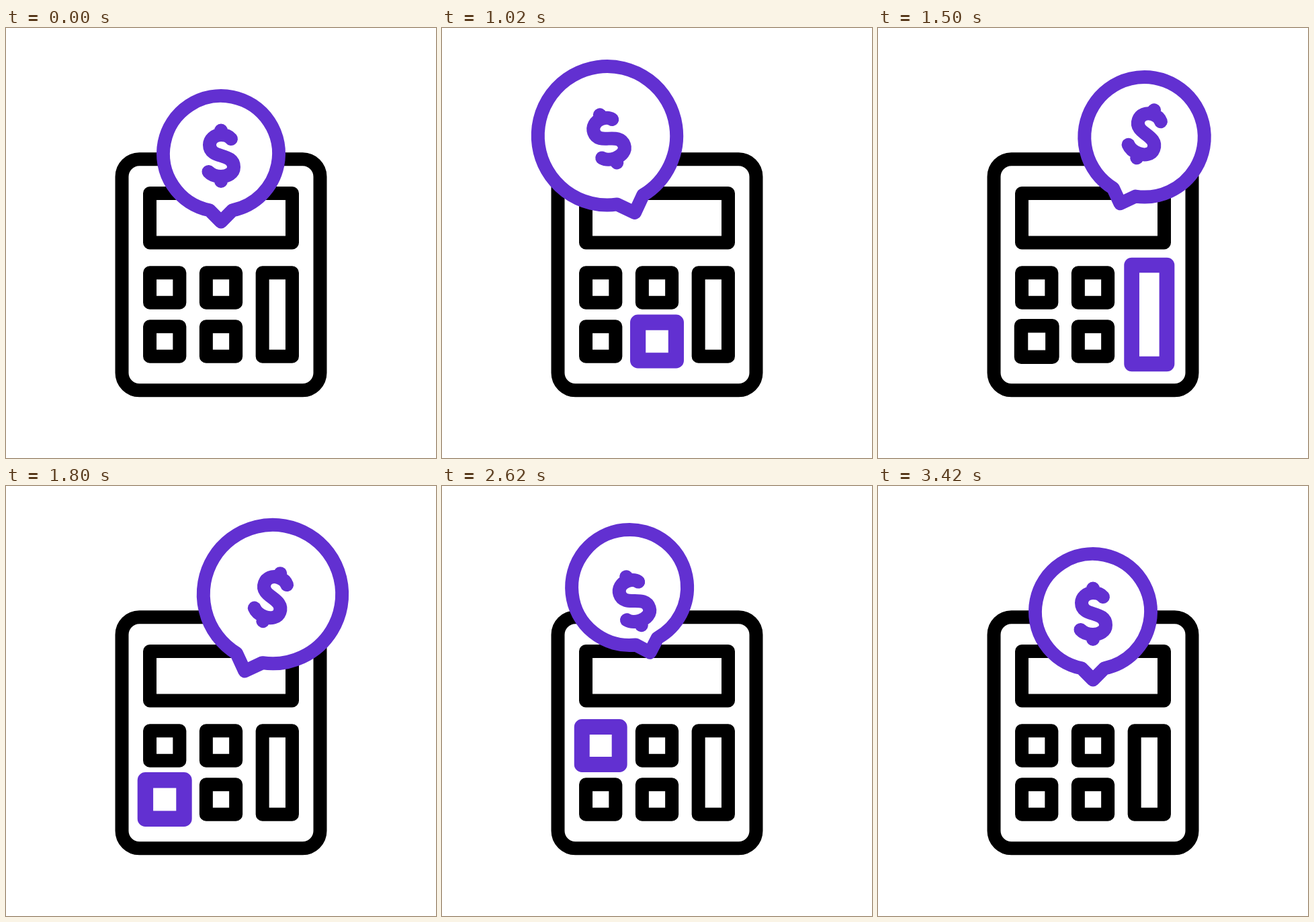
Write an HTML page with a canvas that moves like this. It is 640 by 640 pixels and loops after 3600 ms.

```html
<!DOCTYPE html>
<html lang="en">
<head>
<meta charset="utf-8">
<title>Calculator</title>
<style>
html, body { margin: 0; width: 100%; height: 100%; overflow: hidden; background: #fff; }
canvas { display: block; width: 100vmin; height: 100vmin; }
</style>
</head>
<body>
<canvas id="stage" width="640" height="640"></canvas>
<script>
const ctx = document.getElementById('stage').getContext('2d');
const LOOP = 3600;
const LINE = 20;
const PURPLE = [98, 48, 209];
const VIOLET = `rgb(${PURPLE})`;
const MOVE = 400;   // ms of one bubble move
const RAMP = 140;   // ms to press or release

const smooth = x => {
  x = Math.min(1, Math.max(0, x));
  return x * x * (3 - 2 * x);
};

// Rises after a, falls back to 0 before b
const pulse = (t, a, b, rise = RAMP, fall = rise) =>
  Math.min(smooth((t - a) / rise), smooth((b - t) / fall));

// The bubble leaves for each place at its start time
const rest = { x: 320, y: 190, deg: 0 };
const moves = [
  { start: 220, x: 246.3, y: 164.6, deg: -20 },
  { start: 1000, x: 395.4, y: 165.4, deg: 20 },
  { start: 2260, x: 280, y: 153.8, deg: -17.5 },
  { start: 2620, x: 342.5, y: 127.5, deg: 7.5 },
  { start: 2980, ...rest }
];

function pose(t) {
  let p = rest;
  moves.forEach((to, i) => {
    if (t < to.start) return;
    const end = i + 1 < moves.length ? moves[i + 1].start : LOOP - 180;
    const k = smooth((t - to.start) / Math.min(MOVE, end - to.start));
    const blend = key => p[key] + (to[key] - p[key]) * k;
    p = { x: blend('x'), y: blend('y'), deg: blend('deg') };
  });
  return p;
}

// It swells at each stop
const swell = t => 1 + 0.2 * Math.max(
  pulse(t, 590, 1170), pulse(t, 1462, 2370), pulse(t, 2870, 3190));

// The coin sign lags behind the moves
const lag = t => 18 * pulse(t, 2260, 2970, 370, 320) - 11 * pulse(t, 1050, 1610, 390, 160);

const lift = t => -10 * pulse(t, 2910, 3420, 140, 350);

// Two by two square keys, then the tall one
const SIZE = 44.3;
const keys = [];
for (const y of [386.5, 466.5])
  for (const x of [236.2, 320]) keys.push({ x, y, h: SIZE, max: 0.3 });
keys.push({ x: 403.8, y: 426.5, h: SIZE + 80, max: 0.23 });

const presses = [
  { key: 3, from: 700, to: 1140 },
  { key: 4, from: 1190, to: 1600 },
  { key: 2, from: 1466, to: 1980 },
  { key: 1, from: 1860, to: 2310 },
  { key: 0, from: 2210, to: 2730 },
  { key: 4, from: 2810, to: 3170 }
];

function drawKey(key, p) {
  const s = 1 + key.max * p;
  const w = SIZE * s, h = key.h * s;
  const tint = smooth((p - 0.2) / 0.3);
  ctx.strokeStyle = `rgb(${PURPLE.map(c => Math.round(c * tint))})`;
  ctx.lineWidth = LINE * (1 + 0.17 * p);
  ctx.beginPath();
  ctx.rect(key.x - w / 2, key.y - h / 2, w, h);
  ctx.fill();
  ctx.stroke();
}

function drawCalculator(t) {
  ctx.save();
  ctx.translate(0, lift(t));
  ctx.strokeStyle = '#000';
  ctx.lineWidth = LINE;
  ctx.beginPath();
  ctx.roundRect(172.5, 195.2, 295, 344, 26);
  ctx.stroke();
  ctx.strokeRect(214, 246, 212, 73.5);
  keys.forEach(key => drawKey(key, 0));
  for (const { key, from, to } of presses) {
    const p = pulse(t, from, to);
    if (p > 0) drawKey(keys[key], p);
  }
  ctx.restore();
}

function drawBubble(s) {
  const pivot = 5;
  const at = y => pivot + s * (y - pivot);
  const gap = 0.2;
  ctx.beginPath();
  ctx.arc(0, at(-3), 86 * s, Math.PI / 2 + gap, Math.PI * 2.5 - gap);
  ctx.lineTo(0, at(98.5));
  ctx.closePath();
  ctx.fill();
  ctx.stroke();
}

function drawDollar() {
  ctx.stroke(new Path2D(`M15-25C11-30 5-31 0-31C-10-31-17-24-17-16
    C-17-5-7-2 0 0C10 3 19 6 19 17C19 26 10 31 0 31C-9 31-14 29-18.5 24
    M0-37.5V-31M0 38V31`));
}

function draw(t) {
  ctx.fillStyle = '#fff';
  ctx.fillRect(0, 0, 640, 640);
  ctx.lineJoin = ctx.lineCap = 'round';
  drawCalculator(t);

  const { x, y, deg } = pose(t);
  ctx.save();
  ctx.translate(x, y);
  ctx.rotate(deg * Math.PI / 180);
  ctx.strokeStyle = VIOLET;
  ctx.lineWidth = LINE;
  drawBubble(swell(t));
  ctx.translate(0, lag(t));
  drawDollar();
  ctx.restore();
}

const begin = performance.now();
function tick() {
  draw((performance.now() - begin) % LOOP);
  requestAnimationFrame(tick);
}
tick();
</script>
</body>
</html>
```
